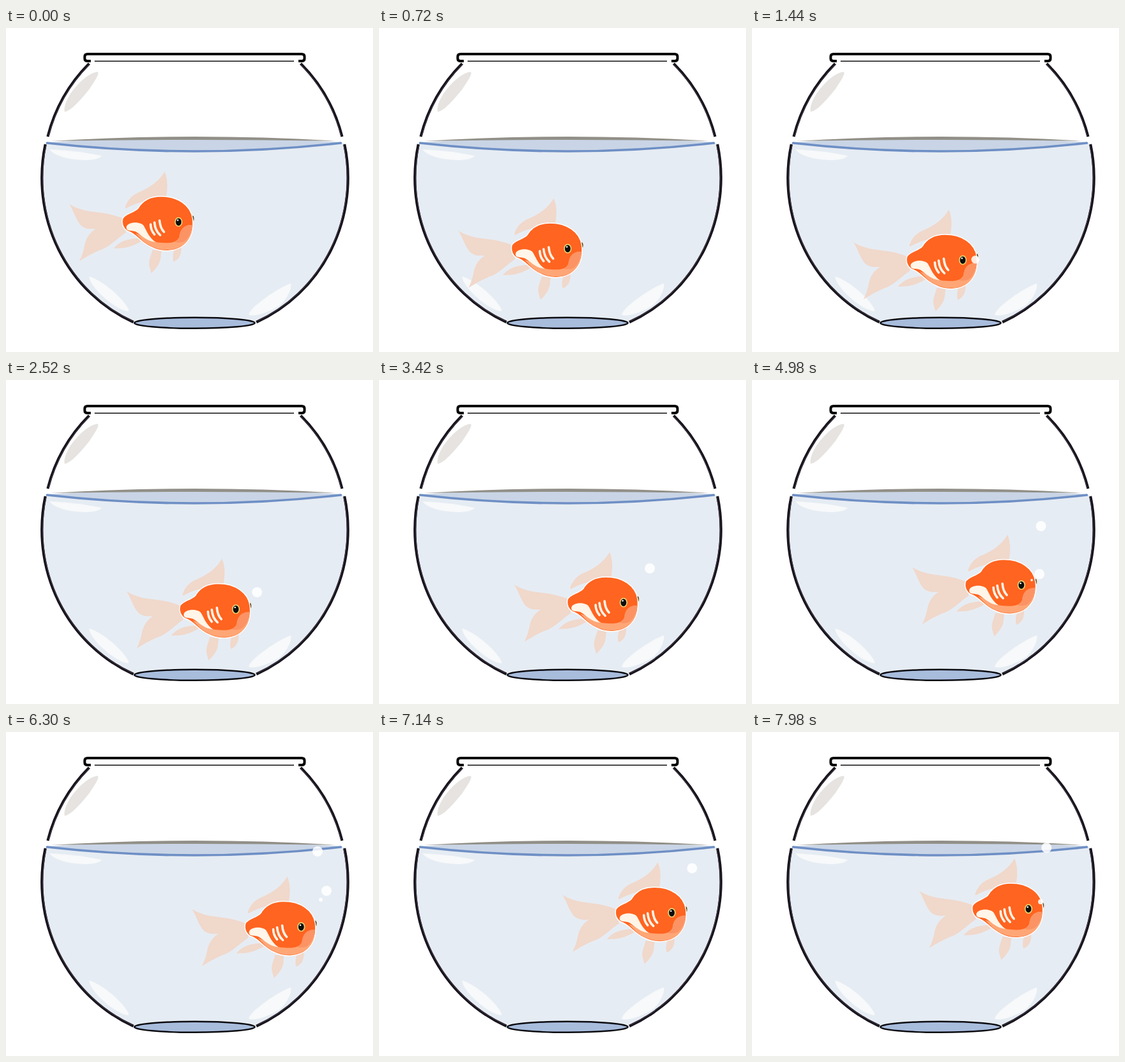
Recreate the animation shown at these times as an HTML page. Size 576 by 510 pixels, loop 8000 ms.

```html
<!DOCTYPE html>
<html lang="en">
<head>
<meta charset="utf-8">
<title>Goldfish bowl</title>
<style>
  html, body { margin: 0; width: 100%; height: 100%; overflow: hidden; background: #fff; }
  svg { display: block; width: 100vw; height: 100vh; }
  .glass { fill: none; stroke: #17131b; stroke-width: 4.2; }
  .sheen { fill: none; stroke: #3a3340; stroke-width: 1.2; }
  .fin { fill: #f0d8cb; }
  .gill { fill: none; stroke: #fff3e6; stroke-width: 3.6; stroke-linecap: round; }
  .shine { fill: #f7f9fa; }
</style>
</head>
<body>
<svg viewBox="0 0 576 510">
  <!-- water -->
  <path fill="#e6ecf3" d="M62 181Q296 207 531 181A240 248 0 0 1 393 463H200A240 248 0 0 1 62 181Z"/>
  <path fill="#c9d5e6" d="M64 180Q180 173 296 173T528 180Q412 193 296 193T64 180Z"/>
  <path fill="#918f87" d="M70 178Q180 171 296 171T522 178Q410 176 296 176T70 178Z"/>

  <!-- glass -->
  <g id="bowl">
    <path class="glass" d="M130.5 56A240 248 0 0 0 65.5 171M61.8 183A240 248 0 0 0 200 463"/>
    <path class="glass" d="M462.5 56A240 248 0 0 1 527.5 171M531.2 183A240 248 0 0 1 393 463"/>
    <path class="sheen" d="M131.5 57A239 247 0 0 0 67 170M62.8 185A239 247 0 0 0 198 461"/>
    <path class="sheen" d="M461.5 57A239 247 0 0 1 526 170M530.2 185A239 247 0 0 1 395 461"/>
  </g>
  <path fill="none" stroke="#000" stroke-width="4" stroke-linejoin="round"
        d="M133 52H128Q123.500 52 123.500 48V45Q123.500 41 128 41H464Q468.500 41 468.500 45V48Q468.500 52 464 52H459"/>
  <path stroke="#111" stroke-width="1.500" d="M139 52.300H452"/>
  <ellipse cx="296" cy="464.300" rx="94.500" ry="8.500" fill="#a8bcdc" stroke="#0b0b10" stroke-width="2.500"/>
  <path fill="none" stroke="#6e8fc5" stroke-width="3.600" stroke-linecap="round" d="M64.500 181Q180 194 296 194T525.500 181"/>

  <!-- reflections -->
  <path fill="#e6e3e0" d="M92 132C88 112 122 72 143 69C149 70 138 85 131 96C119 111 102 131 92 132Z"/>
  <path class="shine" d="M68 191Q111 193 150 201Q146 208 122 208Q80 206 68 191Z"/>
  <path class="shine" d="M131 391C128 403 168 443 192 446C197 442 164 403 131 391Z"/>
  <path class="shine" d="M447 402C428 408 382 440 381 451C388 457 422 444 433 434C442 424 449 410 447 402Z"/>

  <g id="fish">
    <path class="fin" d="M187 282C192 268 200 262 210 258C228 250 240 241 249 226C254 238 254 251 251 268L220 272Q202 276 188 284Z"/>
    <path class="fin" d="M99 277C105 285 108 298 116 309Q123 318 141 316Q128 324 124 339Q121 356 115 367C130 358 140 352 152 348C165 342 176 330 188 322L184 300C165 292 150 291 135 289C120 287 109 283 99 277Z"/>
    <path class="fin" d="M169 347C178 336 190 332 206 331L212 336C198 344 188 347 169 347Z"/>
    <path class="fin" d="M230 349C228 358 223 366 225 375L228 386C236 378 243 370 243 358L244 351Z"/>
    <path class="fin" d="M264 348C262 356 261 362 263 368C272 364 276 356 275 343Z"/>
    <ellipse cx="292" cy="300" rx="3" ry="4.800" fill="#15130f" stroke="#d8c060" stroke-width=".7"/>
    <path id="body" fill="#ff6420" stroke="#fff" stroke-width="1.500" d="M183 300C187 292 200 291 207 284C214 272 226 265 243 265C270 265 290 279 293 300C295 318 290 332 280 341C268 352 245 354 228 345C212 338 207 327 194 321C184 318 181 308 183 300Z"/>
    <path fill="#ffa676" d="M203 323C216 326 226 338 245 338C258 339 268 338 272 329C273 317 280 309 292 310C292 324 288 333 280 340C268 351 245 352 229 344C217 339 211 331 203 323Z"/>
    <path fill="#fb9364" d="M272 329C273 317 280 309 292 310C291 322 287 330 281 335Q275 339 264 337Q270 335 272 329Z"/>
    <path fill="#fff5e8" d="M189 313C191 305 210 304 216 311C221 319 224 330 235 337C222 336 213 327 206 322C200 317 188 322 189 313Z"/>
    <path class="gill" d="M227 309Q227 318 233 325M233 306Q234 319 242 326M241 303Q242 315 248 321"/>
    <ellipse cx="270.800" cy="305.300" rx="5.300" ry="6.700" fill="#0d0d0c" stroke="#ead274" stroke-width="1.700"/>
    <circle cx="269.500" cy="302.500" r="1.300" fill="#fff"/>
  </g>
  <g id="bubbles" fill="#fff" fill-opacity=".86"></g>
</svg>
<script>
const LOOP = 8000, STEP = 30;

// Rows are [ms, x, y]
const swim = [
  [0, 0, 0], [810, 29, 46], [1440, 60, 60], [1620, 67, 61], [2520, 90, 55.5],
  [3420, 113, 45], [4050, 128, 35], [4980, 152, 17.5], [5670, 173, 10],
  [6300, 192.5, 1.5], [6700, 196, -9], [7290, 185, -23.5], [8000, 162.5, -27]
];

const bubbles = [
  { size: 8, end: 6495, path: [[1290, 345, 369], [1440, 350.5, 364.5], [1620, 356, 361],
    [2520, 394, 334], [3420, 425, 296.5], [4050, 437, 266], [4980, 453.5, 230],
    [5670, 470, 208], [6300, 489, 188], [6480, 494, 183]] },
  { size: 8, end: LOOP, path: [[4200, 422, 338], [4620, 436, 321], [4980, 451, 305.5],
    [5670, 479, 278], [6300, 503, 250], [6650, 503.5, 235], [7300, 486.5, 208], [8000, 461.5, 181.5]] },
  { size: 3, end: 6900, path: [[4860, 435, 320], [4980, 439, 315], [6300, 494, 264], [6900, 495, 240]] },
  { size: 4, end: LOOP, path: [[7770, 453, 275], [8000, 453, 266.5]] }
];

// Smooth curve through unevenly timed points
function along(path, t) {
  const last = path.length - 1;
  if (t <= path[0][0]) return path[0].slice(1);
  if (t >= path[last][0]) return path[last].slice(1);
  const i = path.findIndex(p => p[0] > t) - 1;
  const [a, b] = [path[i], path[i + 1]];
  const span = b[0] - a[0], u = (t - a[0]) / span;
  const slope = (k, axis) => {
    const p = path[Math.max(k - 1, 0)], q = path[Math.min(k + 1, last)];
    return (q[axis] - p[axis]) / (q[0] - p[0]);
  };
  return [1, 2].map(axis => {
    const v = 1 - u;
    return a[axis] * v * v * (1 + 2 * u) + b[axis] * u * u * (1 + 2 * v)
      + span * u * v * (slope(i, axis) * v - slope(i + 1, axis) * u);
  });
}

const fish = document.getElementById('fish');
const layer = document.getElementById('bubbles');
for (const bubble of bubbles) {
  bubble.node = document.createElementNS('http://www.w3.org/2000/svg', 'circle');
  layer.append(bubble.node);
}

function draw(t) {
  fish.setAttribute('transform', `translate(${along(swim, t)})`);
  for (const { node, path, size, end } of bubbles) {
    const [x, y] = along(path, t);
    const growth = Math.min(1, Math.max(0, (t - path[0][0]) / 190));
    node.setAttribute('cx', x);
    node.setAttribute('cy', y);
    node.setAttribute('r', t < end ? size * growth : 0);
  }
}

const start = performance.now();
function tick(now) {
  const t = Math.max(0, now - start) % LOOP;
  draw(Math.floor(t / STEP) * STEP);
  requestAnimationFrame(tick);
}
draw(0);
requestAnimationFrame(tick);
</script>
</body>
</html>
```
